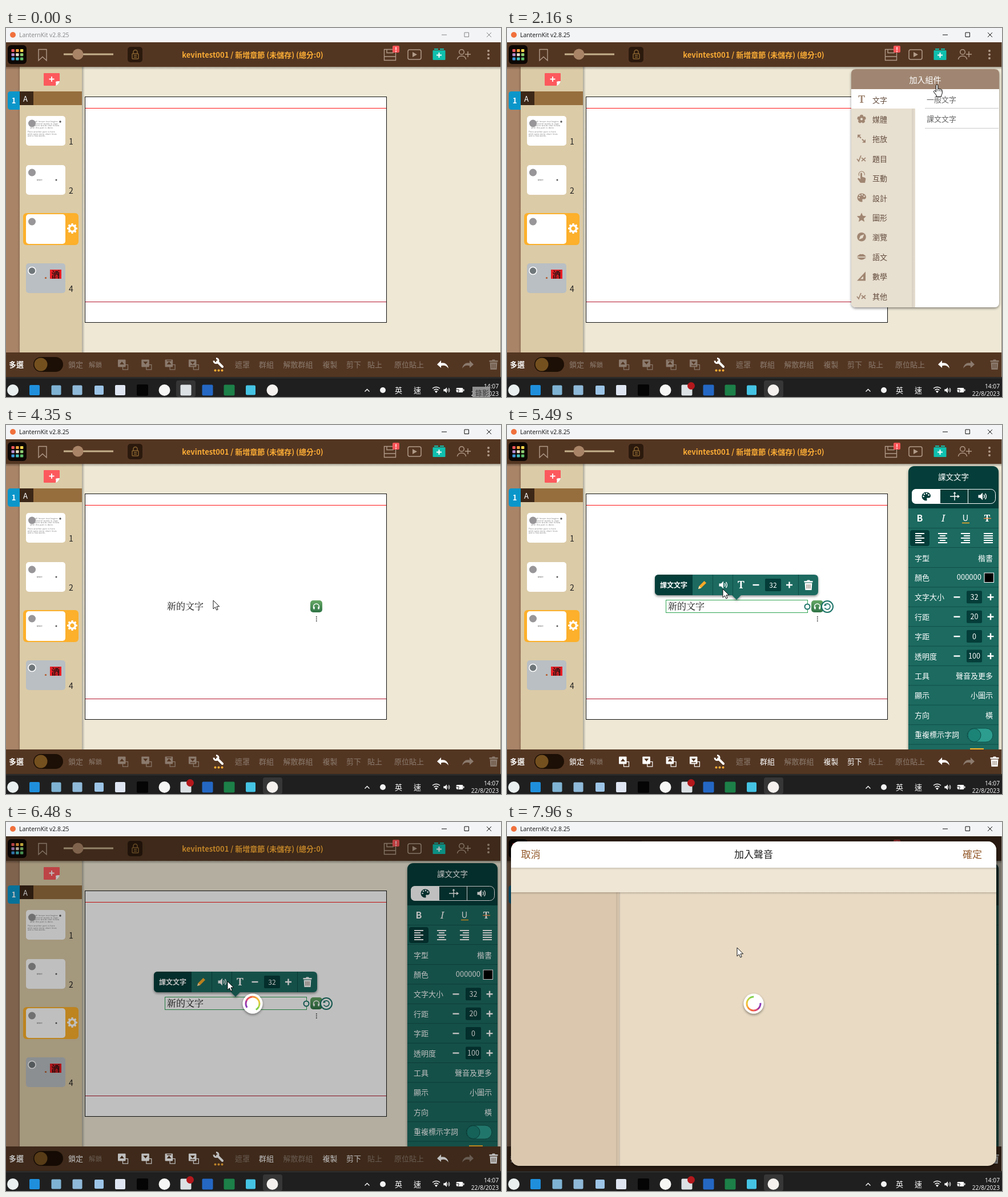
An HTML page that plays this animation: 867 px wide and 646 px high, repeating every 7.99 s.

```html
<!DOCTYPE html>
<html lang="zh-Hant">
<head>
<meta charset="utf-8">
<title>Lesson editor</title>
<style>
html,body{margin:0;width:100%;height:100%;overflow:hidden;background:#202020}
svg{display:block;width:867px;height:646px}
text{font-family:"Noto Sans CJK TC","Noto Sans CJK",sans-serif;white-space:pre}
.sys{font-family:"Open Sans","Noto Sans",sans-serif}
.kai{font-family:"AR PL UKai TW","Noto Serif CJK TC","Noto Sans CJK TC",serif}
.ser{font-family:"Noto Serif","Liberation Serif",serif;font-weight:700}
.b{font-weight:700}.m{font-weight:500}
.mid{text-anchor:middle}.end{text-anchor:end}
</style>
</head>
<body>
<svg id="stage" viewBox="0 0 867 646"></svg>
<script>
const LOOP = 7990;
const BROWN = '#533622', TEAL = '#1a6a61', DEEP = '#043d39', DIM = '#8b7a6d', TAN = '#a08672', LINE = '#b09a88';

// Markup helpers
const rect = (x, y, w, h, f, rx = 0, more = '') => `<rect x="${x}" y="${y}" width="${w}" height="${h}" fill="${f}" rx="${rx}" ${more}/>`;
const circ = (x, y, r, f, more = '') => `<circle cx="${x}" cy="${y}" r="${r}" fill="${f}" ${more}/>`;
const path = (d, f = 'currentColor', more = '') => `<path d="${d}" fill="${f}" ${more}/>`;
const line = (d, c = 'currentColor', w = 1.5, more = '') => `<path d="${d}" fill="none" stroke="${c}" stroke-width="${w}" ${more}/>`;
const text = (x, y, s, size, f, cls = '', more = '') => `<text x="${x}" y="${y}" font-size="${size}" fill="${f}" class="${cls}" ${more}>${s}</text>`;
const at = (x, y, body, more = '') => `<g transform="translate(${x} ${y})" ${more}>${body}</g>`;
const group = (id, body, more = '') => `<g id="${id}" ${more}>${body}</g>`;

// Icons centred on 0,0
const plus = (r = 5, w = 2.4) => line(`M${-r} 0H${r}M0 ${-r}V${r}`, 'currentColor', w);
const minus = (r = 5.5) => line(`M${-r} 0H${r}`, 'currentColor', 2.4);
const speaker = () => path('M-7.5-2.5h3.5l4-4v13l-4-4h-3.5z') + line('M2.2-3q2 3 0 6M4.6-5q3.6 5 0 10', 'currentColor', 1.4);
const trash = () => path('M-7.5-7.5h4.5l1-1.5h4l1 1.5h4.5v2.4h-15zM-6.4-4h12.8l-.8 12.5h-11.2z') + line('M-2.8-1.5v7.5M0-1.5v7.5M2.8-1.5v7.5', BROWN, .8);
const palette = hole => path('M0-7.5C5-7.5 8-4.5 8-1c0 3-2.4 4-5 3.6C.8 2.4 1.2 4.4 1.6 5.5 2 7 1 7.5 0 7.5A7.5 7.5 0 010-7.5z') +
  [[-4.4, 0], [-3, -4], [1, -5], [4.6, -2.4]].map(p => circ(...p, 1.3, hole)).join('');
const check = () => line('M-8 1l3 4 4-10M0-1l7 6M7-1L0 5', 'currentColor', 1.7);
const ring = (n, r, body) => Array.from({length: n}, (_, i) => `<g transform="rotate(${i * 360 / n}) translate(0 ${-r})">${body}</g>`).join('');
const gear = () => ring(8, 7, rect(-1.6, -2, 3.2, 4, '#fff', .5)) + circ(0, 0, 5.4, 'none', 'stroke="#fff" stroke-width="3.4"');
const headset = () => rect(-10.5, -10.5, 21, 21, 'url(#green)', 5) + line('M-5 3v-2.500a5 5 0 0110 0v2.500', '#fff', 1.4) + line('M-4 0.500v4.500M4 .5v4.500', '#fff', 2.4);

const defs = `<defs>
<linearGradient id="down" x2="0" y2="1"><stop stop-opacity=".3"/><stop offset="1" stop-opacity="0"/></linearGradient>
<linearGradient id="right"><stop stop-opacity=".28"/><stop offset="1" stop-opacity="0"/></linearGradient>
<linearGradient id="green" x2="0" y2="1"><stop stop-color="#67a866"/><stop offset="1" stop-color="#2f7446"/></linearGradient>
<filter id="shade" x="-20%" y="-20%" width="140%" height="150%"><feDropShadow dx="0" dy="2" stdDeviation="2" flood-opacity=".45"/></filter>
<clipPath id="app"><rect y="25" width="866" height="586"/></clipPath>
<clipPath id="work"><rect y="25" width="866" height="543"/></clipPath>
<clipPath id="sheet"><rect x="7" y="34" width="850" height="568" rx="15"/></clipPath>
</defs>`;

function titleBar() {
  return rect(0, 0, 867, 25, '#f3f4f6') + circ(12, 12, 5, '#f0703c') +
    group('title', text(23, 16, 'LanternKit v2.8.25', 10.4, 'currentColor', 'sys') +
      line('M763 12h9M803 8h7.500v7.500h-7.500zM842 8l8 8M850 8l-8 8', 'currentColor', 1));
}

function header() {
  const dots = ['#f0565c', '#f7a43c', '#f9d64c', '#b98fd0', '#e8dcc8', '#8fce72', '#3f9be0', '#46c4c0', '#5fbf6a'];
  return rect(0, 25, 866, 43, BROWN) + rect(0, 68, 866, 5, 'url(#down)') +
    rect(3, 30, 33, 33, '#0d0704', 6) +
    dots.map((c, i) => rect(9.5 + i % 3 * 7.7, 37 + (i / 3 | 0) * 7.200, 5.4, 5, c, 1)).join('') +
    line('M57 37.500h14v19.500l-7-6.500-7 6.500z', LINE, 1.4) +
    line('M101 46H188', '#c5b08c', 3) + circ(126, 46, 9.5, '#a98467') +
    rect(213, 33, 26, 27, '#2b190d', 5) + rect(221, 45, 11, 9, 'none', 1, 'stroke="#8a6532" stroke-width="1.4"') +
    line('M223 45v-3a3.500 3.500 0 017 0v3M224 48h5M224 51h5', '#8a6532', 1.4) +
    text(432, 52, 'kevintest001 / 新增章節 (未儲存) (總分:0)', 13, '#fbac35', 'b mid') +
    line('M662.500 37.500h20v19h-20zM667 37.500v6h11v-6M663 50h19', LINE, 1.4) +
    rect(677, 31, 12, 12, '#fb5457', 2) + text(683, 41.5, '!', 11, '#fff', 'b mid') +
    rect(704, 38, 23, 17, 'none', 3, `stroke="${LINE}" stroke-width="1.5"`) + path('M712 42l8 4.500-8 4.500z', LINE) +
    rect(747.5, 39, 22, 17, '#10bfae', 1) + rect(750, 36, 7, 2, '#10bfae') + rect(760, 36, 7, 2, '#10bfae') +
    at(758.5, 47.5, plus(4.5, 2), 'color="#fff"') +
    circ(798, 42, 4.3, 'none', `stroke="${LINE}" stroke-width="1.5"`) +
    line('M790.500 55c0-8 15-8 15 0M804 46h10M809 41v10', LINE, 1.5) +
    [40, 46.5, 53].map(y => circ(845, y, 2, LINE)).join('');
}

function thumb(i, body) {
  const y = 154 + 86 * i, pic = i == 3;
  return rect(35, y, 69, 52, pic ? '#b9bfc3' : '#fff', 5) + body +
    circ(45.5, y + 13, 6.5, pic ? '#70777b' : '#989698', pic ? 'stroke="#fff" stroke-width="1.5"' : '') +
    (i == 2 ? at(116, 351, gear()) : text(114, y + 50, i + 1, 14, '#222', 'mid'));
}

function sidebar() {
  const words = ['A small lesson text begins', 'with several words in rows', 'and more words that follow', 'until the part is done.', '',
    'Then another part is here', 'with some more short lines', 'and a few words.'];
  const small = words.map((s, i) => text(38 + (i < 4 ? 4 : 0), 165 + i * 3.6, s, 3.1, '#555', 'sys', 'letter-spacing=".45"')).join('');
  const mark = y => text(54, y + 1, '新的文字', 2.4, '#333') + circ(88, y, 1.5, '#555');
  return rect(0, 68, 24, 500, '#a98467') + rect(24, 68, 109, 500, '#dbcba7') +
    rect(20, 68, 4, 500, 'url(#right)', 0, 'transform="matrix(-1 0 0 1 44 0)" opacity=".5"') +
    rect(133, 68, 5, 500, 'url(#right)') +
    path('M66 80q0-1 1-1h26q1 0 1 1v13l-7 8H67q-1 0-1-1z', '#fc595d') + path('M94 93q-5 0-7 1 1 4 0 7 5-2 7-8z', '#fff') +
    at(80, 89.5, plus(4.5, 1.8), 'color="#fff"') +
    path('M24 111H8q-5 0-5 5v22q0 5 5 5h16z', '#0b96ca') + text(13.5, 132, '1', 13, '#fff', 'b mid') +
    rect(24, 111, 24, 24, '#3c2717') + rect(48, 111, 85, 24, '#966e3e') + text(34, 129, 'A', 13, '#fff', 'm mid') +
    rect(30, 324, 97, 56, '#fcb02b', 6) +
    thumb(0, small + circ(95, 164, 1.7, '#555')) + thumb(1, mark(266)) + thumb(2, group('mark', mark(352))) +
    thumb(3, rect(77, 423, 20, 16, '#e81f25') + text(87, 437, '酒', 15, '#111', 'kai b mid') + circ(69.5, 437.5, 1.6, '#b5592b'));
}

function page() {
  return rect(138.5, 120.5, 528, 395, '#fff', 0, 'stroke="#111"') + line('M139 140.500H666', '#ff1414', 1) + line('M139 479.500H666', '#b3152c', 1);
}

function lesson() {
  return text(282, 323, '新的文字', 16, '#111', 'kai') + at(543.5, 317.5, headset()) +
    [336, 339.5, 343].map(y => circ(543.8, y, 1, '#333')).join('');
}

function selection() {
  const bar = path('M266 262H538q7 0 7 7v22q0 7-7 7H410l-8 8-8-8H266q-7 0-7-7v-22q0-7 7-7z', TEAL, 'filter="url(#shade)"') +
    path('M325 262H266q-7 0-7 7v22q0 7 7 7h59z', DEEP) + line('M360.500 262v36M395.500 262v36M510.500 262v36', '#0c4d47', 1);
  return rect(278.5, 306.5, 248, 22, 'none', 0, 'stroke="#2fa452"') +
    circ(526, 318, 4.5, '#fff', 'stroke="#1c7468" stroke-width="2"') +
    circ(561, 318, 10, '#fff', 'stroke="#1c7468" stroke-width="2"') +
    line('M556.500 320a5 5 0 102-6.500', '#1c7468', 1.7) + path('M555 317l2-5 3 4z', '#1c7468') +
    bar + `<g color="#fff">` + text(268, 284.5, '課文文字', 12, '#fff', 'b') +
    path('M335 287l1.500-5 9-9 3.500 3.500-9 9z', '#f7a826') + path('M335 287l1.500-5 3.500 3.500z', '#ffe2b0') +
    at(379, 280, speaker()) + text(410, 286, 'T', 18, '#fff', 'ser mid') + at(436, 280, minus()) +
    rect(452, 269, 28, 22, DEEP, 2) + text(466, 284.5, '32', 12, '#fff', 'm mid') +
    at(494.5, 280, plus(5.5)) + at(528, 280.5, trash()) + '</g>';
}

function addPanel() {
  const names = ['文字', '媒體', '拖放', '題目', '互動', '設計', '圖形', '瀏覽', '語文', '數學', '其他'];
  const icons = [
    text(0, 6, 'T', 18, 'currentColor', 'ser mid'),
    ring(5, 4.6, circ(0, 0, 3.1, TAN)) + circ(0, 0, 2, '#e7dfd0'),
    path('M-7-7h6l-6 6zM7 7H1l6-6z') + line('M-4-4l3 3M4 4L1 1', 'currentColor', 2),
    check(),
    path('M-2-8q2-2 3 0v6l5 1.500q2 1 1 4l-1 5h-8l-5-7q1-2 3-1l2 2z') + line('M-4-4a5 5 0 119-1', 'currentColor', 1.2),
    palette('#e7dfd0'),
    path('M0-8l2.400 5.400 5.800.6-4.400 4 1.300 5.800L0 4.800l-5.100 3L-3.800 2l-4.400-4 5.800-.6z'),
    circ(0, 0, 7.8, TAN) + path('M4.500-4.500L2 2l-6.500 2.500L-2-2z', '#e7dfd0'),
    path('M-8 0q5-6 8-4 3-2 8 4z') + path('M-8 1.500h16q-8 8-16 0z'),
    path('M7-8V8H-8zM3 0l-5 5h5z', 'currentColor', 'fill-rule="evenodd"'),
    check()];
  return rect(603, 72, 259, 417, '#fff', 8, 'filter="url(#shade)"') +
    path('M603 107V80q0-8 8-8h243q8 0 8 8v27z', TAN) + text(732.5, 96, '加入組件', 14, '#fff', 'mid') +
    path('M603 141h112v348H611q-8 0-8-8z', '#e7dfd0') + rect(709, 141, 6, 348, 'url(#right)', 0, 'opacity=".25"') +
    names.map((s, i) => at(621, 125 + i * 34.4, icons[i] + text(19, 5.5, s, 13, '#624b3c', 'm'), `color="${TAN}"`)).join('') +
    text(735, 130, '一般文字', 13, '#666') + text(735, 164, '課文文字', 13, '#666') + line('M732 140.500H861M732 175.500H861', '#c9c9c9', 1);
}

function stylePanel() {
  const align = (x, inset) => line([0, 4, 8, 12, 16].map((dy, i) => {
    const cut = i % 2 ? 5 : 0, [a, b] = inset;
    return `M${x - 8 + cut * a} ${190 + dy}H${x + 8 - cut * b}`;
  }).join(''), '#fff', 1.8);
  const rows = [['字型', '楷書'], ['顏色'], ['文字大小', 32], ['行距', 20], ['字距', 0], ['透明度', 100], ['工具', '聲音及更多'], ['顯示', '小圖示'], ['方向', '橫'], ['重複標示字詞']];
  const cells = rows.map(([name, v], i) => {
    const y = 232.5 + i * 34.4;
    const right = typeof v == 'number'
      ? at(788, y, minus()) + rect(805, y - 11, 27, 22, DEEP, 2) + text(818.5, y + 4.5, v, 12.5, '#fff', 'm mid') + at(847, y, plus(5.5))
      : text(851, y + 5, v || '', 13, '#fff', 'm end');
    return text(714, y + 5, name, 13, '#fff', 'm') + right + line(`M703 ${y + 17}H861`, '#0f5049', 1);
  }).join('');
  return path('M703 568V84q0-12 12-12H849q12 0 12 12V568z', TEAL, 'filter="url(#shade)"') +
    path('M703 146V84q0-12 12-12H849q12 0 12 12v62z', DEEP) + text(782, 96, '課文文字', 13.5, '#fff', 'm mid') +
    path('M758 112H717q-8 0-8 8v10q0 8 8 8h41z', '#fff') +
    rect(709.5, 112.5, 146, 25, 'none', 8, 'stroke="#fff"') + line('M758.500 112v26M807.500 112v26', '#fff', 1) +
    at(734, 125, palette('#fff'), `color="${DEEP}"`) + `<g color="#fff">` +
    at(784, 125, line('M-8 0H8M0-7V7', 'currentColor', 1.4) + path('M5-3l4 3-4 3zM-2.500-5L0-8l2.500 3z')) + at(833, 125, speaker()) +
    line('M703 180.500H861M703 214.500H861', '#0f5049', 1) +
    text(723, 169, 'B', 16, '#fff', 'b mid') + text(764, 169, 'I', 17, '#fff', 'ser mid', 'font-style="italic" style="font-weight:400"') +
    text(803, 168, 'U', 15, '#fff', 'mid') + line('M797 171.500h13', '#f7a826', 1.5) +
    text(841, 169, 'T', 16, '#fff', 'ser mid') + line('M835 163.500h13', '#f08a4a', 1.5) +
    rect(706, 184, 34, 28, DEEP, 4) + align(723, [0, 1]) + align(763, [.6, .6]) + align(803, [1, 0]) + align(843, [0, 0]) +
    cells + text(831, 271, '000000', 13, '#fff', 'end') + rect(836, 259, 16.5, 16.5, '#000', 0, 'stroke="#fff"') +
    rect(806, 531, 45, 24, '#2c9d8f', 12, 'stroke="#0f5049"') + circ(818.5, 543, 11.5, '#1c8377', 'stroke="#0f5049"') +
    rect(811, 566, 24, 2, '#f7b32b') + '</g>';
}

function toolbar() {
  const label = (x, s, size = 13) => text(x, 593.5, s, size, 'currentColor', 'm');
  const order = i => {
    const tri = i % 2 ? 'M-4-3.500h8l-4 5z' : 'M-4 1.500h8l-4-5z';
    const edge = i < 2 ? '' : line(i == 2 ? 'M-4-5h8' : 'M-4 3.500h8', BROWN, 1.4);
    return at(203 + i * 41.3, 587.5, rect(1.5, 2, 9, 8.5, 'none', 0, 'stroke="currentColor" stroke-width="1.2"') +
      rect(-7, -7, 13.5, 13, 'currentColor', 1) + path(tri, BROWN) + edge);
  };
  const turn = path('M-10 0l7-7v4.500Q8-4 10 7 5 0-3 2.500V6z');
  return rect(0, 568, 866, 43, BROWN) + text(5, 593.5, '多選', 13, '#fff', 'b') +
    rect(48, 576, 52, 26, '#1c0f05', 13) + circ(61, 589, 11.5, '#74501f') +
    `<g color="${DIM}">` + label(145, '解鎖', 11.5) + label(401, '遮罩') + label(485.5, '解散群組') + label(633, '貼上') + label(680, '原位貼上') +
    at(809, 589, `<g transform="scale(-1 1)">${turn}</g>`) + '</g>' + at(765, 589, turn, 'color="#fff"') +
    group('edit', label(109, '鎖定') + label(443, '群組') + label(554.5, '複製') + label(596, '剪下') + [0, 1, 2, 3].map(order).join('') + at(854, 589.5, trash())) +
    line('M370 584l9 9', '#fff', 4, 'stroke-linecap="round"') + line('M368 578.500a4 4 0 11-4 4', '#fff', 3) +
    [366.5, 372.5, 378.5].map(x => circ(x, 599.5, 2, '#fbac35')).join('');
}

function taskbar() {
  const box = (x, c, s = 18) => rect(x - s / 2, 634 - s / 2, s, s, c, 2);
  return rect(0, 611, 867, 35, '#1f1f1f') + line('M0 612.500H867', '#3a3a3a', 1) +
    group('focusA', rect(298, 617, 34, 29, '#353535', 4)) + group('focusB', rect(450, 617, 34, 29, '#363636', 4)) +
    circ(12, 634, 10, '#e9efee') + box(50, '#1f8fdc') + box(88, '#7fb3d3', 17) + box(125, '#8fb9d8', 17) + box(163, '#9cc4e6', 16) +
    box(200, '#dfe6f2') + box(239, '#050505', 20) + circ(277.5, 634, 10, '#f6f6f4') + box(315, '#dce1e4', 19) +
    box(353, '#2468c4', 19) + box(391, '#1c8048', 19) + box(428.5, '#45c3e3', 17) + circ(466.5, 634, 10, '#f4f1ee') +
    group('rec', circ(322.5, 626.5, 6.5, '#b3181c')) +
    line('M628.500 636.500l4-4 4 4', '#fff', 1.3) + circ(660, 634, 5, '#f2f2f2') +
    text(687.5, 639, '英', 13, '#fff', 'mid') + text(720.5, 639, '速', 13, '#fff', 'mid') +
    line('M747 631q6.500-5 13 0M749.500 634q4-3.500 8 0', '#fff', 1.4) + path('M751 636q2.500-2 5 0l-2.500 3z', '#fff') +
    at(772, 634, `<g transform="scale(.75)">${speaker()}</g>`, 'color="#fff"') +
    rect(789, 630.5, 11, 7, '#fff', 1, 'stroke="#fff"') + rect(801, 632.5, 1.5, 3, '#fff') + path('M788 633h5v3l-2.500 3-2.500-3z', '#fff', 'stroke="#1f1f1f"') +
    text(863, 631, '14:07', 10.2, '#fff', 'sys end') + text(863, 644, '22/8/2023', 10.2, '#fff', 'sys end') +
    group('tip', rect(817, 628, 31, 18, '#9b9b9b', 0, 'opacity=".92"') + text(822, 643.5, '錄影', 12, '#333', 'm'));
}

function modal() {
  return `<g clip-path="url(#app)">` + group('modal', rect(7, 34, 850, 568, '#e8dac3', 15, 'filter="url(#shade)"') +
    `<g clip-path="url(#sheet)">` + rect(7, 123, 189, 479, '#dac7ae') + rect(191, 123, 5, 479, 'url(#right)', 0, 'opacity=".3"') +
    rect(196, 123, 3, 479, 'url(#right)', 0, 'opacity=".6"') +
    rect(7, 80, 850, 43, '#efe6d5') + rect(7, 123, 850, 4, 'url(#down)', 0, 'opacity=".6"') +
    rect(7, 34, 850, 46, '#fff') + rect(7, 80, 850, 4, 'url(#down)', 0, 'opacity=".5"') + '</g>' +
    text(24.5, 62.5, '取消', 17, '#935a2c') + text(432, 63, '加入聲音', 17, '#222', 'm mid') + text(832, 63, '確定', 17, '#935a2c', 'm end')) + '</g>';
}

function spinner() {
  const colors = ['#8a3bb8', '#a0359f', '#e0486a', '#f2603f', '#f58a35', '#f8b435', '#e6c63a', '#b5d344', '#7fcf4c'];
  const step = 275 / colors.length, pt = a => `${12 * Math.cos(a * Math.PI / 180)} ${12 * Math.sin(a * Math.PI / 180)}`;
  const arcs = colors.map((c, i) => line(`M${pt(i * step - 5)}A12 12 0 0 1 ${pt(i * step + step - 4)}`, c, 3)).join('');
  return group('spin', at(432, 318, circ(0, 0, 17.5, '#fff', 'filter="url(#shade)"') + group('arc', arcs)));
}

function pointer() {
  return group('arrow', path('M0 0V15L3.500 11.700 5.800 17 8.200 16 6 10.800H10.700Z', '#fff', 'stroke="#000" stroke-width=".9"')) +
    group('hand', path('M-1.700 1.500q0-1.500 1.600-1.500t1.600 1.500V7.500l1.200-.6q1.300-.4 1.800.9 2-.8 2.600.9 2-.3 2 1.600V14q0 2.500-1.500 4.500V21H-1V19L-5.500 13q-.8-2 .8-2.500 1.200-.2 3 2z', '#fff', 'stroke="#000" stroke-width="1"') +
      line('M1.500 7.500v4M4.500 8.500v3M7.100 9.500v2.500', '#000', .8));
}

const stage = document.getElementById('stage');
stage.innerHTML = defs + rect(0, 25, 867, 586, '#eee8d5') + sidebar() + page() +
  group('lesson', lesson()) + group('selection', selection()) + header() + titleBar() +
  group('add', addPanel()) + group('style', stylePanel(), 'clip-path="url(#work)"') + toolbar() + line('M866.500 25V611', '#8f877b', 1) +
  group('dim', rect(0, 25, 866, 586, '#000')) + modal() + spinner() + taskbar() + pointer();

const el = {};
for (const node of stage.querySelectorAll('g[id]')) el[node.id] = node;

const clamp = v => Math.max(0, Math.min(1, v));
const ramp = (t, a, b) => clamp((t - a) / (b - a));
const smooth = k => k * k * (3 - 2 * k);
const set = (id, k, v) => el[id].setAttribute(k, v);
const alpha = (id, v) => { set(id, 'opacity', v); set(id, 'display', v > 0 ? 'inline' : 'none'); };
const show = (id, on) => alpha(id, on ? 1 : 0);

// Pointer stops: time, x, y
const stops = [[30, 852, 650], [810, 784, 93], [1180, 765, 51], [1800, 765, 51], [2550, 740, 153], [2740, 740, 153],
  [3300, 436, 299], [3460, 412, 315], [3780, 350, 340], [3950, 350, 340], [4250, 363, 307], [5160, 363, 307], [5490, 378, 287],
  [5810, 378, 287], [5840, 378, 284], [6000, 378, 284], [6480, 388, 279], [6780, 391, 251], [7060, 403, 220], [LOOP, 403, 220]];

function pointerAt(t) {
  const i = stops.findIndex(s => s[0] >= t);
  if (i < 1) return [stops[0][1], stops[0][2]];
  const [t0, x0, y0] = stops[i - 1], [t1, x1, y1] = stops[i];
  const k = smooth(ramp(t, t0, t1));
  return [x0 + (x1 - x0) * k, y0 + (y1 - y0) * k];
}

function draw(t) {
  const active = t >= 1310;
  const selected = (t >= 2800 && t < 3870) || t >= 4560;
  set('title', 'color', active ? '#111' : '#858585');
  alpha('tip', 1 - ramp(t, 40, 160));
  show('rec', t >= 90);
  show('focusA', t < 900);
  show('focusB', active);
  alpha('add', t < 4350 ? ramp(t, 1310, 1490) : 0);
  show('lesson', t >= 2800);
  show('mark', t >= 3000);
  show('selection', selected);
  set('edit', 'color', selected ? '#fff' : DIM);
  alpha('style', ramp(t, 4640, 4900));

  alpha('dim', .5 * ramp(t, 6180, 6780));
  alpha('spin', ramp(t, 6090, 6200));
  const turn = t < 7400 ? 150 + .36 * (Math.min(t, 6780) - 6480) : 258 + 102 * ramp(t, 7400, 7960);
  set('arc', 'transform', `rotate(${turn})`);
  const rise = 1 - Math.pow(1 - ramp(t, 7400, 7820), 3);
  show('modal', rise > 0);
  set('modal', 'transform', `translate(0 ${577 * (1 - rise)})`);

  const hand = t > 1080 && t < 2960, where = `translate(${pointerAt(t).join(' ')})`;
  for (const id of ['arrow', 'hand']) set(id, 'transform', where);
  show('hand', hand);
  show('arrow', !hand && t >= 30);
}

const start = performance.now();
function tick() {
  draw((performance.now() - start) % LOOP);
  requestAnimationFrame(tick);
}
draw(0);
requestAnimationFrame(tick);
</script>
</body>
</html>
```
